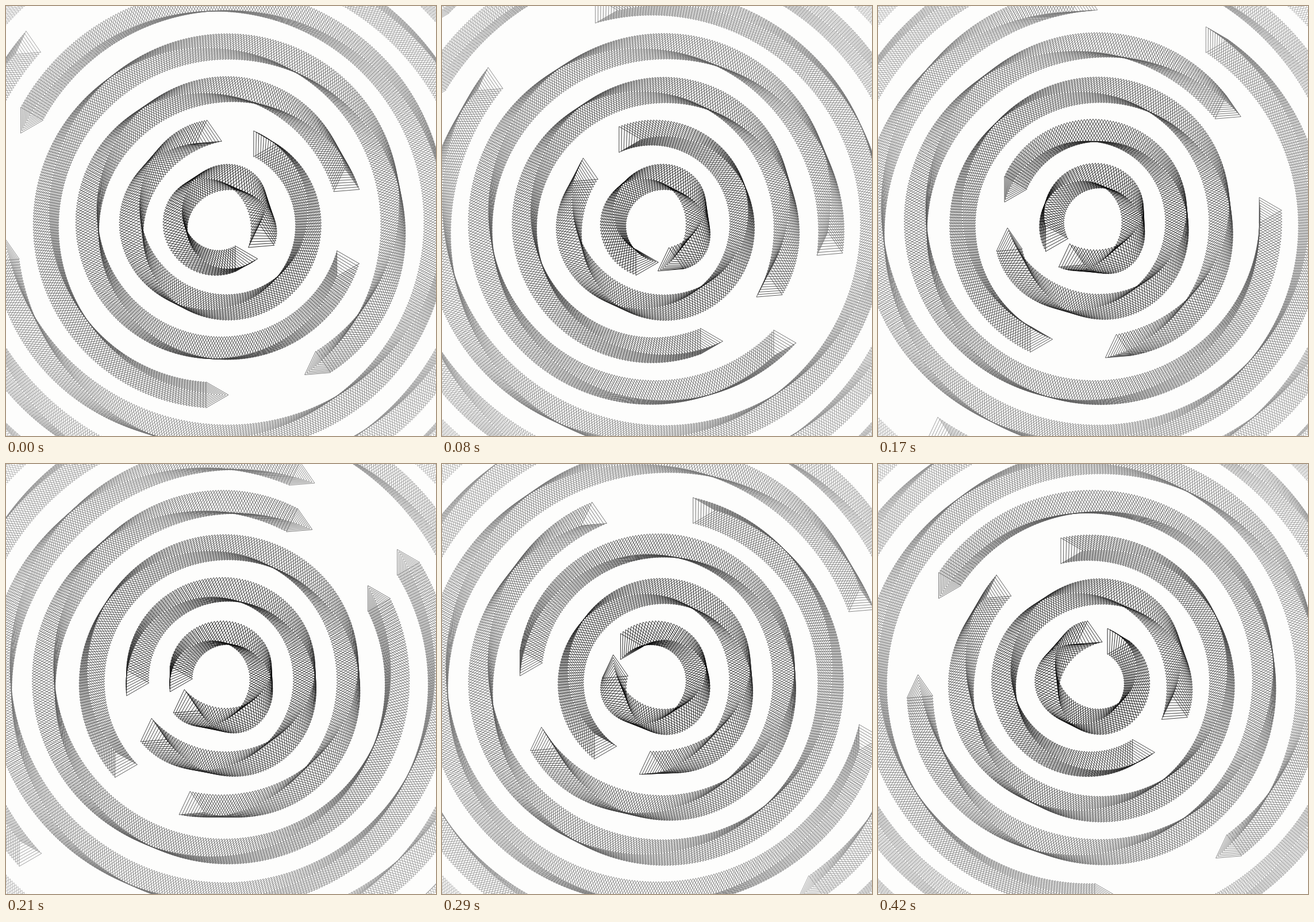
Recreate the animation shown at these times as an HTML page with a canvas. Size 748 by 748 pixels, loop 460 ms.

```html
<!DOCTYPE html>
<html>
<head>
<meta charset="utf-8">
<style>
  html, body { margin: 0; width: 100%; height: 100%; overflow: hidden; background: #fdfdfc; }
  canvas { display: block; }
</style>
</head>
<body>
<canvas id="stage" width="748" height="748"></canvas>
<script>
const ctx = document.getElementById('stage').getContext('2d');
const RAD = Math.PI / 180;
const CENTER = 374;
const SPACING = 75.7;   // distance between rings
const SIZE = 26.1;      // circumradius of a triangle
const PER_RING = 90;    // triangles per ring, times the ring's number
const HALF_GAP = 18;    // degrees
const TURN = 24;        // degrees per step
const LOOP = 460;
const STARTS = [0, 40, 80, 130, 170, 210, 250, 290, 330, 380, 420];
const GAPS = [42.3, 279.5, 1.1, 74.5, 189.6, 240.1, 157]; // first gap angle of each ring

function triangle(x, y, angle) {
  ctx.beginPath();
  for (let i = 0; i < 3; i++) {
    const a = angle + i * 2 * Math.PI / 3;
    ctx.lineTo(x + SIZE * Math.cos(a), y + SIZE * Math.sin(a));
  }
  ctx.closePath();
  ctx.stroke();
}

function ring(k, step) {
  const radius = SPACING * k;
  const count = PER_RING * k;
  const span = 360 - 2 * HALF_GAP;
  const dir = k % 2 ? 1 : -1;
  const start = GAPS[k - 1] + dir * TURN * step + HALF_GAP;
  const shade = 10 + (k - 1) * 27;
  ctx.strokeStyle = `rgb(${shade},${shade},${shade})`;
  for (let i = 0; i <= count; i++) {
    const along = span * i / count;
    const a = (start + along) * RAD;
    // the triangles sway by up to one radian along the arc
    const tilt = Math.sin(0.475 * along * RAD);
    triangle(CENTER + radius * Math.cos(a), CENTER + radius * Math.sin(a), tilt);
  }
}

function draw(step) {
  ctx.fillStyle = '#fdfdfc';
  ctx.fillRect(0, 0, 748, 748);
  ctx.lineWidth = 0.85;
  for (let k = 1; k <= GAPS.length; k++) ring(k, step);
}

const origin = performance.now();
let shown = 0;
draw(0);

function tick() {
  const t = (performance.now() - origin) % LOOP;
  const step = STARTS.filter(s => s <= t).length - 1;
  if (step !== shown) draw(shown = step);
  requestAnimationFrame(tick);
}
requestAnimationFrame(tick);
</script>
</body>
</html>
```
